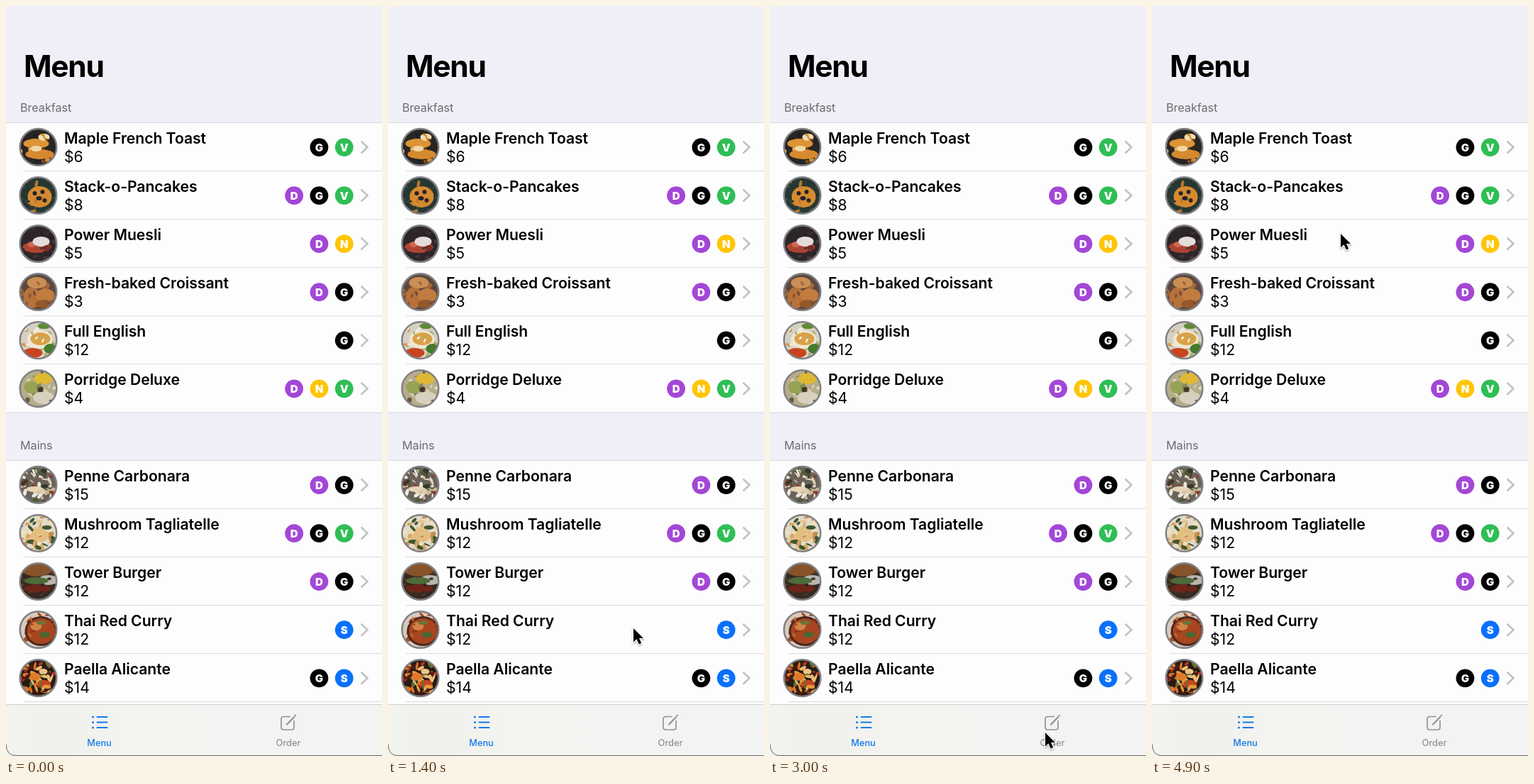
Recreate the animation shown at these times as an HTML page. Size 530 by 1057 pixels, loop 5000 ms.

```html
<!DOCTYPE html>
<html lang="en">
<head>
<meta charset="utf-8">
<title>Menu</title>
<style>
  html, body { margin: 0; width: 100%; height: 100%; overflow: hidden; background: #fff; }
  svg { display: block; width: 530px; height: 1057px; }
  text { font-family: Inter, "Liberation Sans", sans-serif; }
  .title { font-size: 42.5px; font-weight: 700; letter-spacing: -1.3px; }
  .section { font-size: 16.3px; fill: #6c6b70; letter-spacing: -.1px; }
  .name { font-size: 21.2px; font-weight: 600; letter-spacing: -.06px; }
  .price { font-size: 21.2px; }
  .badge { font-size: 15px; font-weight: 900; fill: #fff; text-anchor: middle; }
  .tab { font-size: 12.8px; font-weight: 500; text-anchor: middle; }
  .rule { stroke: #d9d9dc; }
  .icon { fill: none; stroke-linecap: round; stroke-linejoin: round; }
</style>
</head>
<body>
<svg viewBox="0 0 530 1057">
  <defs>
    <clipPath id="round"><circle r="26"/></clipPath>
    <linearGradient id="bar">
      <stop offset="0" stop-color="#f3f3f0"/>
      <stop offset=".12" stop-color="#eff1ec"/>
      <stop offset=".3" stop-color="#f3f3f0"/>
      <stop offset="1" stop-color="#f4f3f3"/>
    </linearGradient>
    <filter id="shade" x="-50%" y="-50%" width="200%" height="200%">
      <feDropShadow dx="0" dy="1.5" stdDeviation="1.3" flood-opacity=".35"/>
    </filter>
  </defs>
  <rect width="530" height="1057" fill="#f0eff7"/>
  <text class="title" x="25" y="99.800">Menu</text>
  <g id="list"></g>

  <rect y="984" width="530" height="73" fill="url(#bar)"/>
  <path d="M0 984.5H530" stroke="#cfcfd0"/>
  <g class="icon" stroke="#147ae8" stroke-width="2">
    <path d="M128.5 1002H142.5M128.5 1009.5H142.5M128.5 1017H142.5"/>
    <path d="M122.5 1002h.01M122.5 1009.5h.01M122.5 1017h.01" stroke-width="3"/>
  </g>
  <g class="icon" stroke="#929294" stroke-width="1.7">
    <path d="M400 1001.5H391.5Q388 1001.5 388 1005V1016.5Q388 1020 391.5 1020H402.5Q406 1020 406 1016.5V1007.5"/>
    <path d="M396 1012.5L406 1002.3M407.5 1000.3L408 999.8" stroke-width="2.3"/>
  </g>
  <text class="tab" x="131.5" y="1042.5" fill="#147ae8">Menu</text>
  <text class="tab" x="398" y="1042.5" fill="#929294">Order</text>
  <path d="M0 1040Q.5 1056.5 14 1056.5H530" fill="none" stroke="#66676a"/>

  <path id="cursor" d="M1 2V21.5L5.5 17.3L8.7 24.6L12.2 23.1L9 15.9H15Z"
    stroke="#fff" stroke-width="2" paint-order="stroke" filter="url(#shade)"/>
</svg>
<script>
const badgeColors = { D: '#a347d6', G: '#000', V: '#2fbe55', N: '#ffc505', S: '#0a70fb' };

// name, price, badges, photo backdrop, speckle colours, main shapes (x y rx ry colour)
const breakfast = [
  ['Maple French Toast', 6, 'GV', '#292522', '#d98a2b #1b2030 #8d4d1c #e6b05a',
    '-3 -5 18 7 #dc9436|2 10 20 7 #d68a30|8 -14 8 5 #f2dfb4|-3 2 8 4 #f0d8a4'],
  ['Stack-o-Pancakes', 8, 'DGV', '#263733', '#344a42 #1e2c2b #b8762f',
    '2 2 17 15 #d68a30|-5 -3 3 3 #20232c|6 -5 3 3 #20232c|1 4 4 3 #26232a|9 7 3 3 #2b2528'],
  ['Power Muesli', 5, 'DN', '#2d2628', '#332b2d #241f21 #443639',
    '-2 5 20 8 #ad4433|-9 1 6 4 #d06650|4 -3 12 7 #e4dcd9|12 6 5 4 #7c2b26'],
  ['Fresh-baked Croissant', 3, 'DG', '#5b4840', '#8b5731 #6a4a38 #a5683a',
    '-9 8 12 15 #b7713a|10 5 13 10 #c17c40|-2 -13 14 8 #c98f54|8 17 12 6 #94582c'],
  ['Full English', 12, 'G', '#d6d0c2', '#f0ebdf #cf9a4c #a6b076',
    '2 -1 18 13 #f0e6d2|3 -2 14 9 #daa145|-8 18 14 7 #c9431f|17 12 9 7 #457b2c|8 -20 9 4 #5c8a35'],
  ['Porridge Deluxe', 4, 'DNV', '#b5ac8a', '#d8cfb6 #7f8850 #655b42 #e0d8c8',
    '7 -14 13 8 #dfb834|-10 -2 10 9 #96a355|8 13 15 9 #d8d0be|3 1 4 4 #47352b']
];
const mains = [
  ['Penne Carbonara', 15, 'DG', '#6a6259', '#e2d6bf #34392b #8f392c #c5b497 #4c5a3a #eee8dc',
    '-5 6 12 4 #e4d4b4|9 9 10 4 #dccaaa'],
  ['Mushroom Tagliatelle', 12, 'DGV', '#e2dac8', '#d7a765 #efe0bd #3d5632 #c48c4c #e4c58f',
    '0 3 15 10 #e3bd80|-10 12 7 3 #40572f|12 -8 7 3 #40572f'],
  ['Tower Burger', 12, 'DG', '#35291f', '#2a2420 #51372a #40332b',
    '-2 -17 21 10 #86532b|14 -2 14 7 #b9b5af|-3 -1 17 5 #4f6b3a|-1 10 19 6 #6e241a'],
  ['Thai Red Curry', 12, 'S', '#d8cabd', '#a84822 #c56c2c #8c3419',
    '4 2 23 21 #49281e|4 2 20 18 #a84520|-3 -5 8 6 #d08344|9 7 8 4 #4e6530|4 -10 7 3 #6e7438'],
  ['Paella Alicante', 14, 'GS', '#2a1a13', '#dc7426 #b83520 #ebbd76 #491c13 #e39a3c #637033',
    '-5 -2 9 5 #df7a2d|8 8 9 5 #c8441f|7 -9 6 4 #edc58b']
];

let seed = 7;
const rand = (a, b) => {
  seed = seed * 16807 % 2147483647;
  return a + (b - a) * seed / 2147483647;
};
const ellipse = (x, y, rx, ry, fill, turn = 0) =>
  `<ellipse rx="${rx}" ry="${ry}" fill="${fill}" transform="translate(${x} ${y}) rotate(${turn})"/>`;

function photo(backdrop, colors, shapes) {
  const palette = colors.split(' ');
  const busy = palette.length > 4;
  const speckles = (n, size) => Array.from({ length: n }, (_, i) =>
    ellipse(rand(-24, 24), rand(-24, 24), rand(2.5, size), rand(1, size / 2),
      palette[i % palette.length], rand(0, 180))).join('');
  return `<g transform="translate(45.5 34.4)"><g clip-path="url(#round)">
    <circle r="26" fill="${backdrop}"/>${speckles(busy ? 34 : 18, 6.5)}
    ${shapes.split('|').map(s => ellipse(...s.split(' '))).join('')}${speckles(busy ? 18 : 7, busy ? 6 : 4)}
    </g><circle r="25.8" fill="none" stroke="#808084" stroke-width="2.5"/></g>`;
}

function badge(letter, i, all) {
  const x = 476.7 - 35.3 * (all.length - 1 - i);
  return `<circle cx="${x}" cy="34.6" r="12.9" fill="${badgeColors[letter]}"/>
    <text class="badge" x="${x}" y="40">${letter}</text>`;
}

function section(title, y, dishes) {
  const rows = dishes.map(([name, price, badges, ...art], i) => `
    <g transform="translate(0 ${y + i * 68.05})">
      ${i ? '<path class="rule" d="M25 0H530"/>' : ''}
      ${photo(...art)}
      <text class="name" x="82" y="29.7">${name}</text>
      <text class="price" x="82" y="55.7">$${price}</text>
      ${[...badges].map(badge).join('')}
      <path d="M500.5 26L509.5 34.5L500.5 43" fill="none" stroke="#c3c3c7" stroke-width="2.7"/>
    </g>`).join('');
  const end = y + dishes.length * 68.05;
  return `<text class="section" x="20" y="${y - 16}">${title}</text>
    <rect y="${y}" width="530" height="${end - y}" fill="#fefdfe"/>
    <path class="rule" d="M0 ${y}H530"/>${rows}`;
}

document.getElementById('list').innerHTML =
  section('Breakfast', 164.5, breakfast) + '<path class="rule" d="M0 573H530"/>' +
  section('Mains', 640.5, mains) +
  '<rect y="980" width="530" height="5" fill="#fefdfe"/><path class="rule" d="M25 980.5H530"/>';

// pointer path: time, x, y
const path = [
  [0, 285, 1080], [500, 303, 966], [1400, 345, 875], [1800, 345, 1003], [2100, 345, 991],
  [2600, 385, 1032], [3000, 387, 1022], [3700, 400, 1010], [4200, 370, 890], [4900, 265, 319]
];
const cursor = document.getElementById('cursor');

function frame() {
  const t = Math.floor(performance.now() / 100) * 100 % 5000;
  const i = Math.max(1, path.findIndex(p => p[0] >= t));
  const [t0, x0, y0] = path[i - 1], [t1, x1, y1] = path[i];
  const u = (t - t0) / (t1 - t0), k = u * u * (3 - 2 * u);
  cursor.setAttribute('transform', `translate(${x0 + (x1 - x0) * k} ${y0 + (y1 - y0) * k})`);
  requestAnimationFrame(frame);
}
frame();
</script>
</body>
</html>
```
